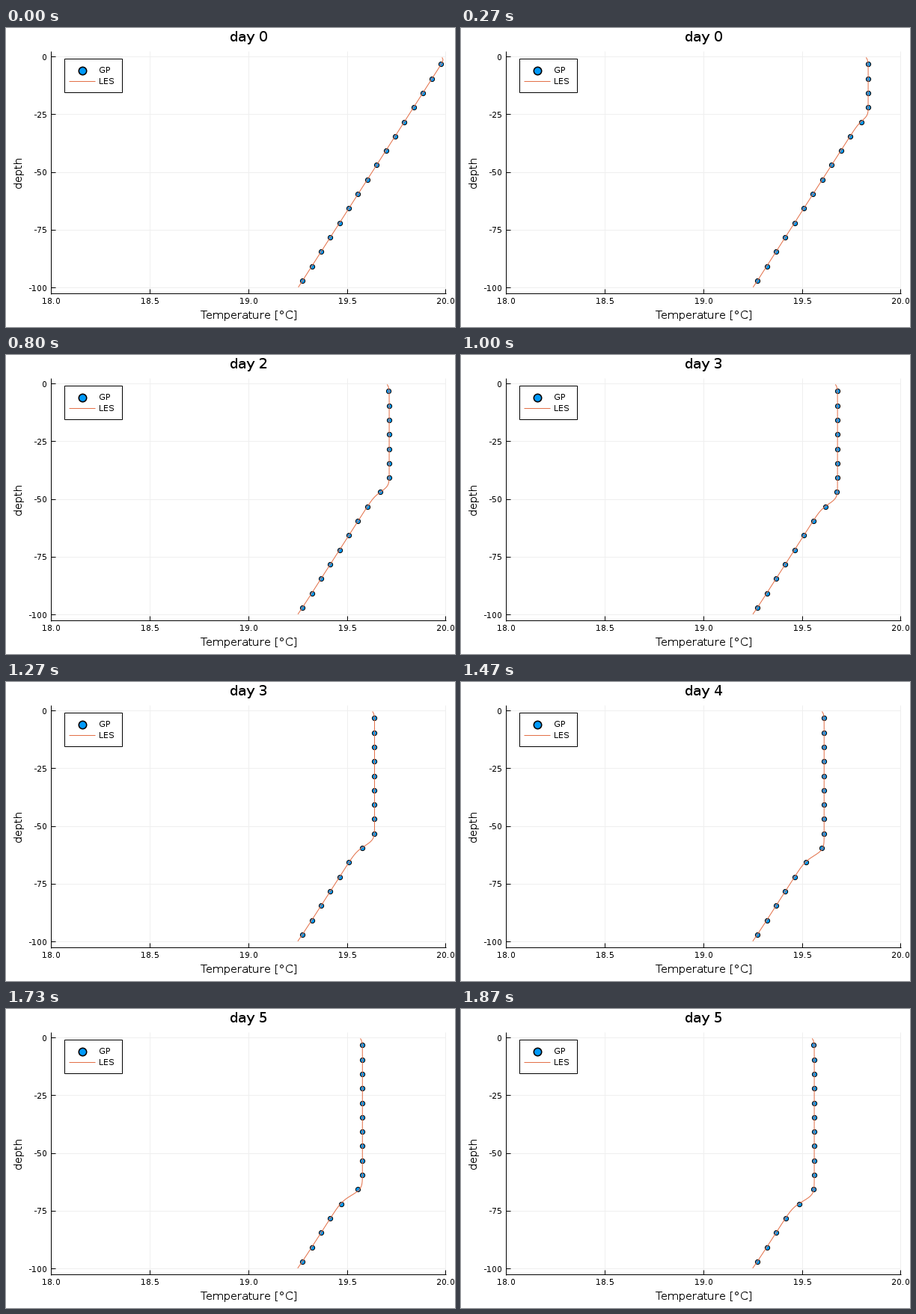
A matplotlib script for the animation above (1940 ms loop, 600x400 px).

```python
import numpy as np
import matplotlib.pyplot as plt
from matplotlib.animation import FuncAnimation
from matplotlib.patches import Rectangle

plt.rcParams["font.family"] = "DejaVu Sans"
plt.rcParams["text.hinting"] = "default"
plt.rcParams["text.hinting_factor"] = 1    # whole-pixel glyph advances

W, H, DPI = 600, 400, 100
PT = 72 / DPI                      # points per pixel
LOOP, TICK = 1940, 10              # ms
STEP, STEPS = 200 / 3, 29          # 15 poses per second

BLUE, ORANGE, GRID = "#009AFA", "#E36F47", "#EFEFEF"
LEFT, RIGHT, TOP, BOTTOM = 60.5, 587.9, 31, 355

CELLS, BLOCK = 128, 8
SLOPE = 0.0075                     # initial stratification, degrees per metre
depth = (np.arange(CELLS) + 0.5) * 100 / CELLS


def px(temp):
    return LEFT + (temp - 18) * (RIGHT - LEFT) / 2


def py(d):
    return 38.6 + 3.09 * d


def coarse(a):
    return a.reshape(-1, BLOCK).mean(axis=1)


def profile(k):
    """Convective mixed layer deepening with the square root of time."""
    root = np.sqrt(k)
    temp = 20 - SLOPE * depth
    if k:
        mixed = 20 - 0.083 * root
        base, width = 13.22 * root, 0.9 + 0.1 * root
        temp += (mixed - temp) / (1 + np.exp((depth - base) / width))
    amp, scale = (0.0095, 1.05) if k else (0.016, 0.8)
    temp -= amp * np.exp(-(depth - depth[0]) / scale)
    temp -= 0.0007 * root * np.exp((depth - 100) / 4)
    return temp


fig = plt.figure(figsize=(W / DPI, H / DPI), dpi=DPI, facecolor="white")
ax = fig.add_axes([0, 0, 1, 1])
ax.set_xlim(0, W)
ax.set_ylim(H, 0)
ax.axis("off")


def curve(z):
    return ax.plot([], [], color=ORANGE, lw=PT, zorder=z)[0]


def rule(x0, y0, x1, y1, color="black", z=2):
    """Straight one-pixel line; whole numbers snap to that pixel's centre."""
    ax.plot(np.floor([x0, x1]), np.floor([y0, y1]), color=color, lw=PT,
            zorder=z, solid_capstyle="butt", snap=True)


def dots(xs, ys, size, edge, z):
    return ax.plot(xs, ys, "o", ms=size * PT, mfc=BLUE, mec="black",
                   mew=edge * PT, zorder=z, snap=False)[0]


def label(x, y, text, size, ha="center", **kw):
    return ax.text(x, y, text, fontsize=size * PT, ha=ha, va="baseline",
                   color="black", zorder=6, **kw)


for temp in np.arange(18, 20.1, 0.5):
    x = px(temp)
    if temp > 18:
        rule(x, TOP, x, BOTTOM, GRID, 1)
    rule(x, BOTTOM, x, BOTTOM - 6)
    label(x, 369.3, f"{temp:.1f}", 11.1)

for d in range(0, 101, 25):
    y = py(d)
    rule(LEFT, y, RIGHT, y, GRID, 1)
    rule(LEFT, y, LEFT + 6, y)
    label(55, y + 4.1, str(-d), 11.1, "right")

rule(LEFT, TOP, LEFT, BOTTOM + 1)
rule(LEFT, BOTTOM, RIGHT + 1, BOTTOM)
label(324.5, 389, "Temperature [°C]", 15.2)
label(21, 193, "depth", 15.2, rotation=90, rotation_mode="anchor")
title = label(324.3, 18, "", 19.4)

ax.add_patch(Rectangle((78, 41), 77, 45, fc="white", ec="black",
                       lw=PT, zorder=5, snap=True))
dots([101.5], [56.7], 10.4, 1.6, 6)
rule(84, 71, 119, 71, ORANGE, 6)
label(124, 60.4, "GP", 11.1, "left")
label(124, 75.4, "LES", 11.1, "left")

gp = dots([], [], 6.2, 1, 3)
les = curve(4)


def update(i):
    k = min(int((i * TICK + 4) / STEP), STEPS - 1)
    temp = profile(k)
    les.set_data(px(temp), py(depth))
    gp.set_data(px(coarse(temp)), py(coarse(depth)))
    title.set_text(f"day {5 * k // 24}")
    return gp, les, title


anim = FuncAnimation(fig, update, frames=LOOP // TICK, interval=TICK,
                     repeat=True, repeat_delay=0)
plt.show()
```
